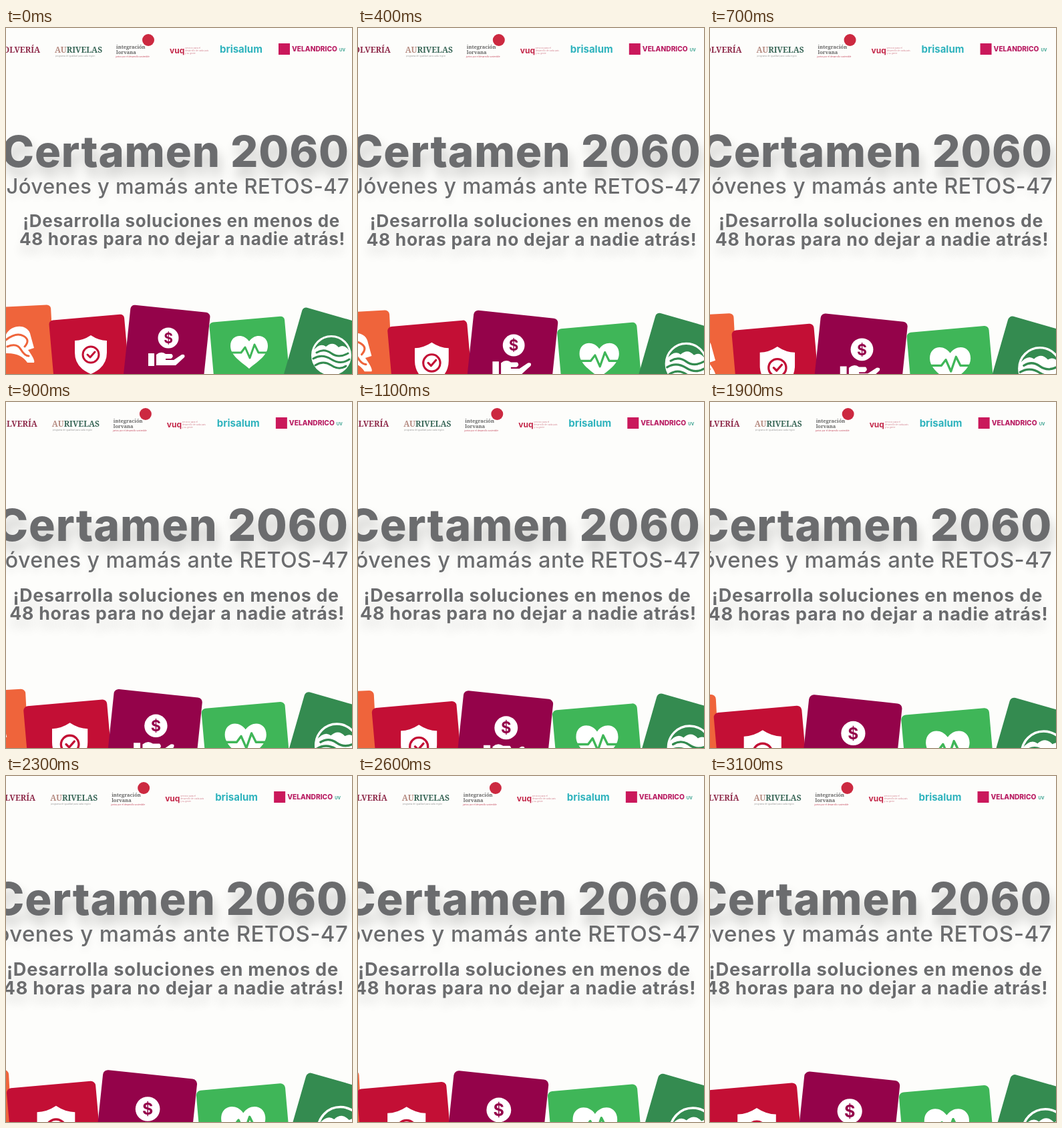
Animation of 518 by 518 pixels, one loop 3.2 s. Source, as an HTML page:

```html
<!DOCTYPE html>
<html lang="es">
<head>
<meta charset="utf-8">
<style>
html, body { margin: 0; width: 100%; height: 100%; overflow: hidden; background: #fdfdfb; }
svg { display: block; width: 100vw; height: 100vh; --p: 0; }
text { font-family: Inter, sans-serif; }

/* --p runs from 0 to 1 as the camera settles */
#logos { transform: translateX(calc(-7.5px * var(--p))); }
#cards { transform-origin: 412px 275px; transform: scale(calc(1 + .2 * var(--p))); }
#lines text {
  text-anchor: end;
  fill: #6b6c6e;
  transform: translateX(calc(-2px * var(--p))) scale(calc(1 + var(--grow) * var(--p)));
}
.title { --grow: .03; transform-origin: 514px 208px; font-size: 65px; font-weight: 800; letter-spacing: .9px; text-shadow: 4px 14px 18px #0003; }
.subtitle { --grow: .07; transform-origin: 514px 248px; font-size: 31px; font-weight: 500; letter-spacing: .4px; text-shadow: 0 7px 12px #0001; }
.call { --grow: .052; transform-origin: 505px 280px; font-size: 26px; font-weight: 700; letter-spacing: .7px; text-shadow: 0 14px 16px #0000001c; }

.serif { font: 700 12px "Noto Serif", serif; }
.small { font: 600 7.5px "Noto Serif", serif; fill: #666; }
.tiny { font-size: 3.2px; }
.white { fill: #fff; }
.line { fill: none; stroke: currentColor; stroke-width: 3; stroke-linecap: round; stroke-linejoin: round; }
.card { fill: currentColor; }
</style>
</head>
<body>
<svg viewBox="0 0 518 518" preserveAspectRatio="none">
  <defs><rect id="card" class="card" width="113" height="150" rx="6"/></defs>

  <g id="logos">
    <text class="serif" x="51" y="37" text-anchor="end" fill="#8d2848">SOLVERÍA</text>
    <text class="serif" x="73" y="37" fill="#386657"><tspan fill="#b58a80">AU</tspan>RIVELAS</text>
    <text class="tiny" x="74" y="43" fill="#999">programa de igualdad para cada región</text>
    <circle cx="213" cy="18" r="9" fill="#cc2940"/>
    <text class="small" x="165" y="31">integración</text>
    <text class="small" x="165" y="39">lorvana</text>
    <text class="tiny" x="164" y="44" fill="#c4455a">juntos por el desarrollo sostenible</text>
    <text x="245" y="38" fill="#c4284a" font-size="12" font-weight="700">vuq</text>
    <g class="tiny" fill="#d3808f">
      <text x="268" y="31">servicio para el</text>
      <text x="268" y="35">desarrollo de cada país</text>
      <text x="268" y="39">y su gente</text>
    </g>
    <text x="320" y="37" fill="#2fb3bd" font-size="15" font-weight="700">brisalum</text>
    <rect x="408" y="23" width="17" height="17" fill="#ca185b"/>
    <text x="428" y="35" fill="#b91e63" font-size="10.2" font-weight="800">VELANDRICO</text>
    <text x="499" y="35" fill="#35a08e" font-size="6" font-weight="700">UV</text>
  </g>

  <g id="lines">
    <text class="title" x="514" y="208">Certamen 2060</text>
    <text class="subtitle" x="514" y="248">Jóvenes y mamás ante RETOS-47</text>
    <text class="call" x="500" y="298">¡Desarrolla soluciones en menos de</text>
    <text class="call" x="508" y="325">48 horas para no dejar a nadie atrás!</text>
  </g>

  <g id="cards">
    <g color="#ef643b">
      <use href="#card" transform="translate(-46 420) rotate(-3)"/>
      <g transform="translate(20 467)">
        <path class="white" d="M-20-8C-12-24 14-25 17-6L22 12 13 15Q24 30 22 34H12Q2 19-20 20Z"/>
        <path class="line" d="M-20 0Q-5-12 6-6T8 10M-18 10Q-4 4 2 14T14 24"/>
      </g>
    </g>
    <g color="#c30f35">
      <use href="#card" transform="translate(64 438) rotate(-5)"/>
      <g transform="translate(127 460)">
        <path class="white" d="M0 0Q12 8 24 8V26Q24 48 0 58Q-24 48-24 26V8Q-12 8 0 0Z"/>
        <circle class="line" cy="29" r="12"/>
        <path class="line" d="M-5 29L-1 33 6 25"/>
      </g>
    </g>
    <g color="#3fb658">
      <use href="#card" transform="translate(304 441) rotate(-5)"/>
      <g transform="translate(364 461)">
        <path class="white" d="M0 8C9-5 28-2 28 15C28 30 10 40 0 49C-10 40-28 30-28 15C-28-2-9-5 0 8Z"/>
        <path class="line" d="M-29 25H-12L-6 17 1 33 8 13 14 25H29"/>
      </g>
    </g>
    <g color="#94034a">
      <use href="#card" transform="translate(187 414) rotate(6) scale(1.06)"/>
      <g transform="translate(243 464)">
        <circle class="white" r="15.5"/>
        <text y="7.5" font-size="21" font-weight="700" text-anchor="middle" fill="currentColor">$</text>
        <path class="white" d="M-30 23H-21V42H-30ZM-18 25Q-11 19-4 24H5Q9 28 4 31H-4V33H8L20 25Q26 24 24 29L11 41H-18Z"/>
      </g>
    </g>
    <g color="#348b50">
      <use href="#card" transform="translate(445 417) rotate(16)"/>
      <g transform="translate(487 460)">
        <circle class="line" cy="30" r="28.5" stroke="#fff" style="stroke:#fff"/>
        <path class="white" d="M-28 24Q-17 10-8 17Q2 8 11 18Q20 12 28 25A28.5 28.5 0 1 1-28 24Z"/>
        <path class="line" d="M-22 26Q-11 19 0 27T25 27M-27 35Q-14 27 0 36T27 36M-24 45Q-12 37 0 45T22 46"/>
      </g>
    </g>
  </g>
</svg>
<script>
const LOOP = 3200, STEP = 100, TAU = 1300;
const stage = document.querySelector('svg');
const settle = t => 1 - Math.exp(-t / TAU);

function draw() {
  const t = Math.floor(performance.now() % LOOP / STEP) * STEP;
  stage.style.setProperty('--p', settle(t) / settle(LOOP - STEP));
  requestAnimationFrame(draw);
}
draw();
</script>
</body>
</html>
```
